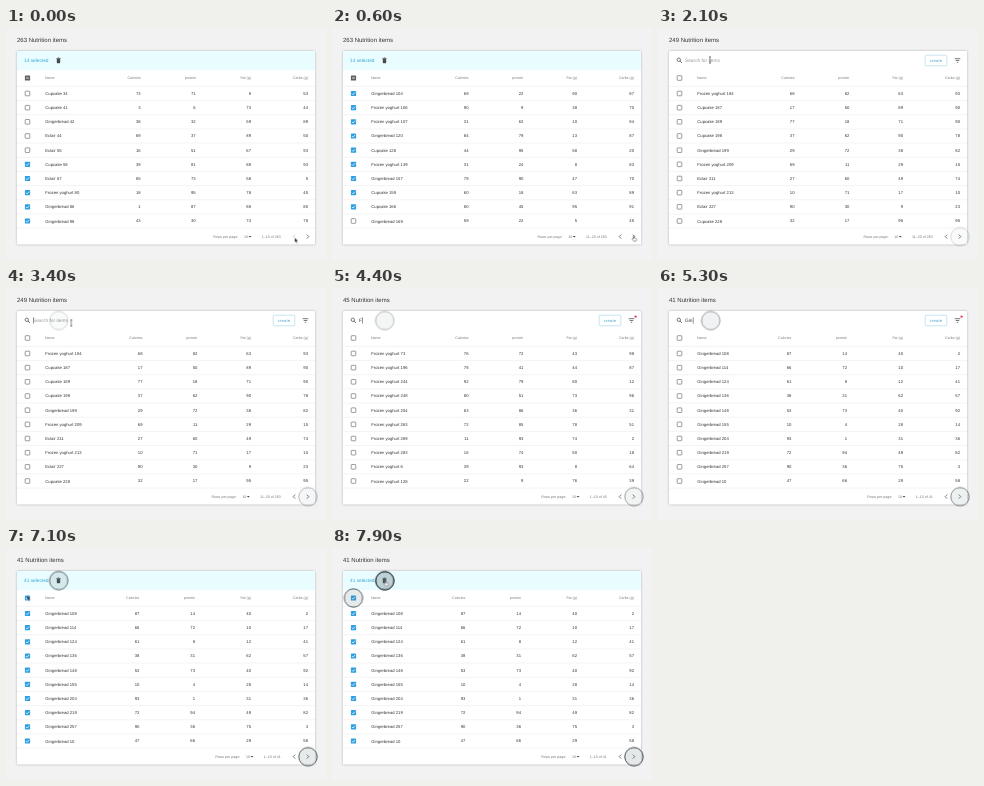
Animation, 320 px wide and 232 px high, one loop 8000 ms. Source, as an HTML page:

```html
<!DOCTYPE html>
<html lang="en">
<head>
<meta charset="utf-8">
<title>Nutrition items</title>
<style>
  html, body { margin: 0; width: 100%; height: 100%; overflow: hidden; background: #f2f2f2; }
  svg { display: block; width: 100vw; height: 100vh; }
  text { font-family: "Liberation Sans", Arial, sans-serif; font-size: 4.2px; fill: #333; text-rendering: geometricPrecision; }
  .title { font-size: 6px; fill: #333; }
  .head { font-size: 3.6px; fill: #777; }
  .bar { font-size: 4.8px; }
  .hint { fill: #999; }
  .picked { fill: #35a9d6; }
  .create { font-size: 4px; fill: #3a9fc8; letter-spacing: .2px; }
  .end { text-anchor: end; }
  .card { fill: #fff; filter: drop-shadow(0 .5px .9px rgba(0, 0, 0, .28)); }
  .line { stroke: #e3e3e3; stroke-width: .4; }
  .icon { fill: none; stroke: #555; stroke-width: .8; }
  .dark { fill: #4a4a4a; }
  .ring { fill: rgba(90, 110, 120, .16); stroke: #2f383d; stroke-width: .9; }
</style>
</head>
<body>
<svg id="stage" viewBox="0 0 320 232">
  <rect class="card" x="11" y="23" width="298" height="193.5" rx="1"/>
</svg>
<script>
const LOOP = 8000, ROW = 14.17, TOP = 58.4;
const stage = document.getElementById('stage');
const sheet = document.head.appendChild(document.createElement('style'));
let count = 0;

function el(name, attrs = {}, parent = stage, content = '') {
  const node = document.createElementNS('http://www.w3.org/2000/svg', name);
  for (const key in attrs) node.setAttribute(key, attrs[key]);
  node.textContent = content;
  return parent.appendChild(node);
}

const text = (g, x, y, content, cls = '') => el('text', { x, y, class: cls }, g, content);
const path = (g, d, attrs) => el('path', { d, ...attrs }, g);

// stops: [ms, declarations]
function animate(node, stops, easing = 'linear') {
  const id = 'k' + count++;
  const body = stops.map(([ms, css]) => `${ms / LOOP * 100}%{${css}}`).join('');
  sheet.textContent += `@keyframes ${id}{${body}}\n`;
  node.style.animation = `${id} ${LOOP}ms ${easing} infinite`;
}

function show(node, ...spans) {
  const stops = [[0, 'opacity:0']];
  for (const [from, to] of spans) stops.push([from, 'opacity:1'], [to, 'opacity:0']);
  animate(node, stops, 'step-end');
  return node;
}

const scene = (from, to) => show(el('g'), [from, to]);

function checkbox(g, y, state) {
  const box = { x: 18.9, y: y - 2.6, width: 5.2, height: 5.2, rx: .6 };
  if (!state) {
    el('rect', { ...box, x: 19.2, y: y - 2.3, width: 4.6, height: 4.6, fill: '#fff', stroke: '#666', 'stroke-width': .65 }, g);
    return;
  }
  const mixed = state === 'mixed';
  el('rect', { ...box, fill: mixed ? '#606060' : '#2e9fe0' }, g);
  path(g, mixed ? `M20 ${y}h3` : `M20 ${y + .1}l1.1 1.1 2-2.3`, { fill: 'none', stroke: '#fff', 'stroke-width': .75 });
}

function table(from, to, { rows, total, pager, cols, all = '', picked = () => false }) {
  const g = scene(from, to);
  const edges = [...cols, 245, 302];
  text(g, 11, 13.6, `${total} Nutrition items`, 'title');
  checkbox(g, 50, all);
  text(g, 39, 51.3, 'Name', 'head');
  ['Calories', 'protein', 'Fat (g)', 'Carbs (g)'].forEach((label, i) => text(g, edges[i], 51.3, label, 'head end'));
  path(g, `M11 ${TOP}H309`, { class: 'line' });
  rows.forEach(([name, ...values], i) => {
    const y = TOP + ROW * (i + .5);
    checkbox(g, y, picked(i));
    text(g, 39.3, y + 1.5, name);
    values.forEach((v, c) => text(g, edges[c], y + 1.4, v, 'end'));
    path(g, `M11 ${TOP + ROW * (i + 1)}H309`, { class: 'line' });
  });
  const label = text(g, 274.7, 210, pager, 'head end');
  const start = 274.7 - label.getComputedTextLength();
  text(g, start - 23.4, 210, 'Rows per page:', 'head end');
  text(g, start - 17.7, 210, '10', 'head');
  path(g, `M${start - 13.2} 207.9h3l-1.5 1.7z`, { class: 'dark' });
  path(g, 'M289.2 206.6l-2 2 2 2', { class: 'icon', opacity: total === 263 && pager[1] === '–' ? .35 : 1 });
  path(g, 'M300.8 206.6l2 2-2 2', { class: 'icon' });
}

function searchBar(from, to, query) {
  const g = scene(from, to);
  el('circle', { cx: 20.8, cy: 31.8, r: 1.7, class: 'icon' }, g);
  path(g, 'M22 33l2 2', { class: 'icon' });
  text(g, 27, 34, query || 'Search for items', query ? 'bar' : 'bar hint');
  el('rect', { x: 267.2, y: 27.2, width: 21.6, height: 10.6, rx: 1, fill: '#fff', stroke: '#8ccbe2', 'stroke-width': .5 }, g);
  text(g, 271.8, 33.8, 'create', 'create');
  path(g, 'M296.7 30.7h5.6M297.7 32.5h3.6M298.8 34.3h1.4', { class: 'icon' });
  if (query) el('circle', { cx: 303.6, cy: 28.6, r: 1.2, fill: '#e0455e' }, g);
}

function pickedBar(from, to, n) {
  const g = scene(from, to);
  el('rect', { x: 11, y: 23, width: 298, height: 19.2, fill: '#e9fcff' }, g);
  text(g, 18, 34.1, `${n} selected`, 'bar picked');
  path(g, 'M50.8 31.1h3.4v3.4q0 .7-.7.7h-2q-.7 0-.7-.7zM50.4 30h1.2l.4-.4h1l.4.4h1.2v.7h-4.2z', { class: 'dark' });
}

function caret(x, ...spans) {
  show(el('rect', { x, y: 29.2, width: .5, height: 6.4, fill: '#333' }), ...spans);
}

function ring(x, y, from, to) {
  const g = el('g', { transform: `translate(${x} ${y})` });
  const dot = el('circle', { r: 9.2, class: 'ring' }, g);
  const hold = 'animation-timing-function:step-end';
  animate(dot, [
    [0, `opacity:0;${hold}`],
    [from, `opacity:1;transform:scale(.65);${hold}`],
    [(from + to) / 2, 'opacity:1;transform:scale(.97)'],
    [to - 1, `opacity:1;transform:scale(1);${hold}`],
    [to, 'opacity:0'],
  ]);
}

const named = (name, list) => list.map(([id, ...v]) => [`${name} ${id}`, ...v]);

const first = [
  ['Cupcake 34', 73, 71, 8, 53], ['Cupcake 41', 3, 6, 73, 44],
  ['Gingerbread 42', 38, 32, 59, 89], ['Eclair 44', 69, 37, 89, 50],
  ['Eclair 55', 16, 51, 67, 93], ['Cupcake 58', 39, 81, 88, 93],
  ['Eclair 67', 65, 73, 58, 5], ['Frozen yoghurt 80', 18, 95, 78, 45],
  ['Gingerbread 86', 1, 87, 88, 80], ['Gingerbread 98', 43, 30, 74, 78],
];
const second = [
  ['Gingerbread 104', 69, 22, 90, 87], ['Frozen yoghurt 106', 90, 9, 38, 70],
  ['Frozen yoghurt 107', 31, 63, 10, 84], ['Gingerbread 120', 84, 79, 13, 87],
  ['Cupcake 128', 44, 95, 58, 20], ['Frozen yoghurt 139', 31, 24, 8, 83],
  ['Gingerbread 157', 79, 90, 47, 70], ['Cupcake 159', 60, 18, 63, 89],
  ['Cupcake 166', 80, 45, 95, 91], ['Gingerbread 169', 59, 22, 5, 45],
];
const third = [
  ['Frozen yoghurt 184', 68, 82, 63, 93], ['Cupcake 187', 17, 50, 89, 90],
  ['Cupcake 189', 77, 18, 71, 90], ['Cupcake 198', 37, 62, 90, 78],
  ['Gingerbread 199', 29, 72, 38, 82], ['Frozen yoghurt 209', 69, 11, 29, 15],
  ['Eclair 211', 27, 60, 49, 74], ['Frozen yoghurt 213', 10, 71, 17, 10],
  ['Eclair 227', 90, 30, 9, 23], ['Cupcake 228', 32, 17, 95, 95],
];
const yoghurt = named('Frozen yoghurt', [
  [73, 76, 72, 43, 98], [196, 78, 41, 44, 87], [244, 92, 79, 80, 12], [248, 80, 51, 73, 96],
  [254, 63, 86, 36, 31], [263, 72, 85, 78, 51], [269, 11, 93, 74, 2], [283, 16, 74, 50, 18],
  [6, 39, 93, 8, 64], [128, 22, 9, 76, 39],
]);
const ginger = named('Gingerbread', [
  [108, 87, 14, 40, 2], [114, 66, 72, 10, 17], [124, 61, 8, 12, 41], [136, 38, 31, 62, 57],
  [148, 53, 73, 40, 92], [155, 10, 4, 28, 14], [204, 93, 1, 31, 36], [219, 72, 94, 49, 82],
  [257, 90, 36, 75, 3], [10, 47, 66, 29, 58],
]);

const wide = [136.5, 191.3], mid = [134.7, 189.7], slim = [133.3, 189];
const gin = { rows: ginger, total: 41, pager: '1–10 of 41', cols: slim };

table(0, 600, { rows: first, total: 263, pager: '1–10 of 263', cols: mid, all: 'mixed', picked: i => i > 4 });
table(600, 2000, { rows: second, total: 263, pager: '11–20 of 263', cols: wide, all: 'mixed', picked: i => i < 9 });
table(2000, 4400, { rows: third, total: 249, pager: '11–20 of 263', cols: wide });
table(4400, 4800, { rows: yoghurt, total: 45, pager: '1–10 of 45', cols: wide });
table(4800, 5100, { rows: [...first.slice(0, 5), second[9], ...third.slice(0, 4)], total: 249, pager: '1–10 of 249', cols: wide });
table(5100, 5200, { rows: [...ginger.slice(0, 5), ...yoghurt.slice(0, 5)], total: 86, pager: '1–10 of 86', cols: wide });
table(5200, 7000, gin);
table(7000, 8000, { ...gin, all: 'all', picked: () => true });

pickedBar(0, 2000, 14);
searchBar(2000, 4400, '');
searchBar(4400, 4800, 'F');
searchBar(4800, 5100, '');
searchBar(5100, 5200, 'G');
searchBar(5200, 5300, 'Gi');
searchBar(5300, 7000, 'Gin');
pickedBar(7000, 8000, 41);

caret(27, [3200, 3700], [4100, 4400], [4800, 5100]);
caret(30.2, [4400, 4800]);
caret(31, [5100, 5200]);
caret(32.1, [5200, 5300]);
caret(34.9, [5300, 5800], [6300, 6600]);

ring(302, 208.7, 400, 600);
ring(52.7, 32.6, 1600, 2000);
ring(21.5, 50, 6900, 7100);
ring(52.9, 32.9, 7600, 8000);

const pointer = el('g');
const arrow = path(pointer, 'M0 0V4.6L1.1 3.6 1.9 5.4 2.6 5.1 1.8 3.3H3.3Z', { fill: '#111', stroke: '#fff', 'stroke-width': .3 });
const hand = path(pointer, 'M-.5.4Q-.5-.2 0-.2T.5.4V2.1L2.4 2.6Q3 2.9 2.8 3.8L2.4 5.2H-.2L-1.6 3.2Q-1.4 2.4-.5 3Z', { fill: '#fff', stroke: '#222', 'stroke-width': .4 });
const beam = path(pointer, 'M-1-3.3Q0-3.3 0-2.6 0-3.3 1-3.3M0-2.6V2.6M-1 3.3Q0 3.3 0 2.6 0 3.3 1 3.3', { fill: 'none', stroke: '#222', 'stroke-width': .55 });
show(arrow, [0, 250], [800, 1600], [5800, 6550], [7100, 7400]);
show(hand, [250, 800], [1600, 2000], [6550, 7100], [7400, 8000]);
show(beam, [2000, 4000]);

const at = (ms, x, y, ease = 'ease-in-out') =>
  [ms, `transform:translate(${x}px,${y}px);animation-timing-function:${ease}`];
animate(pointer, [
  at(0, 288.7, 209.8), at(50, 288.7, 209.8), at(300, 301.7, 208), at(750, 301.7, 208, 'ease-in'),
  at(900, 282.5, 208, 'cubic-bezier(.35,.1,.35,1)'), at(1500, 62, 32.8, 'ease-out'), at(1750, 53, 32),
  at(1950, 53, 32), at(2100, 52, 32), at(2700, 61, 34.5), at(3050, 61, 34.5),
  at(3200, 65, 35), at(3350, 65, 35), at(3700, 70, 32.4), at(5750, 70, 32.4),
  at(6050, 86, 71), at(6600, 21.3, 47.6), at(7100, 21.3, 47.6), at(7500, 53.6, 32.6), at(8000, 53.6, 32.6),
]);
</script>
</body>
</html>
```
